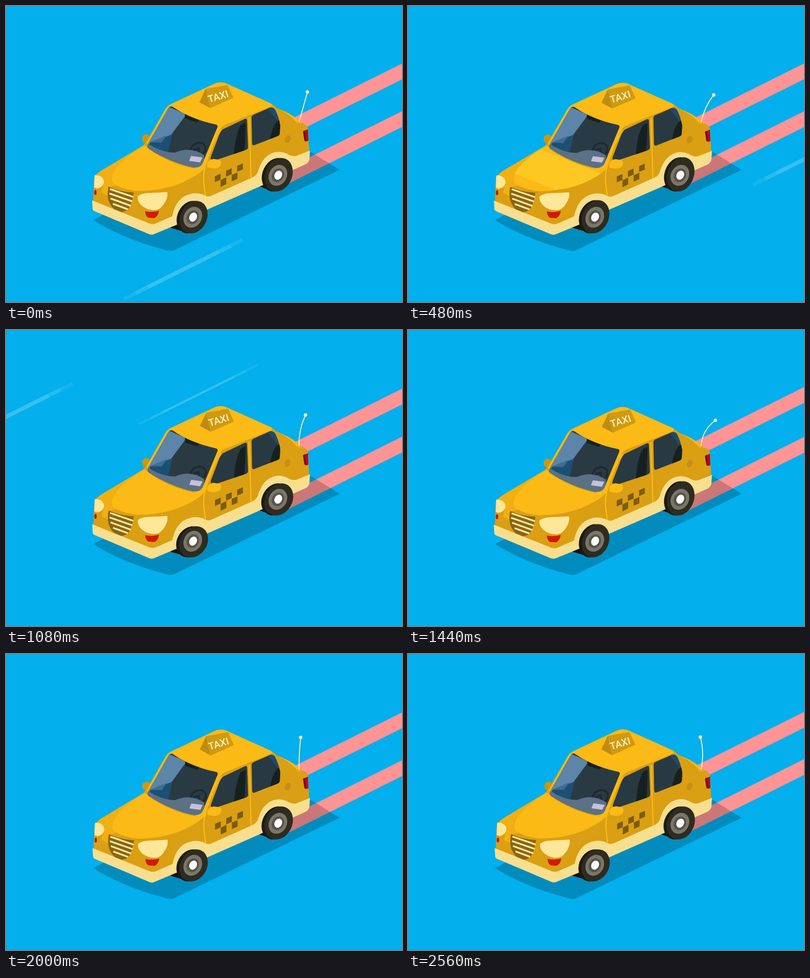
Animation, 800 px wide and 600 px high, one loop 2.6 s. Source, as an HTML page:

```html
<!DOCTYPE html>
<html lang="en">
<head>
<meta charset="utf-8">
<title>Taxi ride</title>
<style>
  html, body { margin: 0; width: 100%; height: 100%; overflow: hidden; background: #03afec; }
  svg { display: block; width: 800px; height: 600px; }
  text { font: 500 20px Roboto, sans-serif; text-anchor: middle; }
</style>
</head>
<body>
<svg viewBox="0 0 800 600">
  <defs>
    <path id="glass" d="M328 207Q332 201 338 205Q372 229 423 240Q429 241 427 246L397 319Q392 329 377 327Q330 316 288 289Q284 285 287 279Z"/>
    <path id="hood" d="M214 348Q216 332 240 311Q262 293 281 282Q286 289 300 298Q340 322 378 329L404 326Q392 340 372 350Q330 374 266 375Q236 372 218 361Q213 356 214 348Z"/>
    <path id="frontWindow" d="M438 250L482 229Q487 227 487 233L489 286Q489 290 484 292L422 313Q411 315 414 305L427 271Q432 255 438 250Z"/>
    <path id="rearWindow" d="M496 226Q496 222 501 220L533 206Q541 204 545 213Q551 226 554 242L553 258Q553 262 548 264L502 282Q497 284 497 277Z"/>
    <clipPath id="inGlass"><use href="#glass"/></clipPath>
    <clipPath id="inHood"><use href="#hood"/></clipPath>
    <clipPath id="inFront"><use href="#frontWindow"/></clipPath>
    <clipPath id="inRear"><use href="#rearWindow"/></clipPath>
    <path id="band" d="M150-76L460 48V118L150-6Z"/>
    <g id="tire">
      <ellipse cx="373" cy="428.5" rx="27" ry="34" fill="#1b1a14" transform="rotate(28 373 428.5)"/>
      <ellipse cx="379" cy="428.5" rx="27" ry="34" fill="#2e2c20" transform="rotate(28 379 428.5)"/>
    </g>
    <g id="rim" transform="rotate(28 378 428)">
      <ellipse cx="377.5" cy="428.5" rx="18" ry="22" fill="#7b7768"/>
      <ellipse cx="377.5" cy="428.5" rx="12" ry="14.5" fill="#56534a"/>
      <ellipse cx="378" cy="428" rx="7.5" ry="9.5" fill="#fff"/>
    </g>
    <!-- nested strokes make the stepped fade at both ends -->
    <g id="streak" stroke="#fff" stroke-opacity=".075">
      <path d="M0 0L240-120M24-12L216-108M48-24L192-96"/>
      <path d="M24-12L216-108"/>
      <path d="M48-24L192-96"/>
    </g>
  </defs>

  <g fill="#fe9496">
    <path id="trackA" d="M572 231L810 112V144L572 263Z"/>
    <path id="trackB" d="M550 338L810 208V240L550 370Z"/>
  </g>
  <path d="M176 434L202 420L400 370L616 296L674 332L340 495Q334 498 324 495Q240 474 176 434Z" opacity=".2"/>
  <g id="streaks"></g>
  <path d="M328 448L350 438L354 456ZM510 365L526 352L530 372Z" fill="#14130e"/>

  <g id="car">
    <ellipse cx="283" cy="269" rx="8.5" ry="9" fill="#d0960f"/>
    <path fill="#da9f13" d="M178 347Q182 340 195 332L275 285L284 274L322 209Q326 202 335 198L420 158Q432 152 445 157L534 197Q542 201 546 206L570 217Q586 226 597 237Q610 240 610 250L613 300L400 400L295 450L176 402Z"/>
    <path fill="#fbba15" d="M284 277L322 209Q326 202 335 198L420 158Q432 152 445 157L534 197Q542 202 532 205L440 242Q430 248 423 268L403 325L390 331L288 291Z"/>
    <path fill="#f0b014" d="M180 346Q185 338 197 331L282 280L262 296Q219 327 214 348Q212 356 222 364L207 367L205 384L192 378L199 355Z"/>
    <path fill="#fbba15" d="M546 206L570 217Q586 226 597 237L588 237Q575 220 546 206Z"/>
    <use href="#hood" fill="#fbba15"/>
    <path fill="none" stroke="#fbba15" stroke-width="2.5" d="M434 250Q418 275 405 315Q397 340 400 362L403 386M491 226L495 349"/>

    <use href="#glass" fill="#2a3a43"/>
    <g clip-path="url(#inGlass)">
      <path fill="#5c85a9" d="M320 200L364 220L333 262L280 290Z"/>
      <path fill="#1d4f72" d="M291 277L336 260L326 300L286 288Z"/>
      <path fill="#3e6d91" d="M291 276L325 262L314 277Z"/>
      <path fill="#16211f" d="M361 215L392 229L386 236L362 228Z"/>
      <ellipse cx="388" cy="291" rx="16" ry="13" fill="none" stroke="#1e2a31" stroke-width="4" transform="rotate(-30 388 291)"/>
      <path fill="none" stroke="#1e2a31" stroke-width="4" d="M378 292L389 288L391 302"/>
      <path fill="#5a7186" d="M280 274Q312 298 342 297Q372 284 400 302V340H280Z"/>
      <path fill="#c9c0d8" d="M374 304L397 307L392 317L370 314Z"/>
      <use class="band" href="#band" fill="#55c8f5" opacity=".42"/>
    </g>
    <g clip-path="url(#inHood)"><use class="band" href="#band" fill="#ffd42e" opacity=".55"/></g>

    <use href="#frontWindow" fill="#293942"/>
    <path clip-path="url(#inFront)" fill="#16211f" d="M484 236L474 241Q463 262 460 305L481 299Q484 262 484 236Z"/>
    <use href="#rearWindow" fill="#293942"/>
    <g clip-path="url(#inRear)">
      <path fill="#1e4b6b" d="M527 205H547L556 242L548 232Z"/>
      <path fill="#16211f" d="M550 232Q537 242 533 275L556 266V232Z"/>
    </g>

    <path fill="#7b5c12" d="M422 345l11.5-5v12l-11.500 5zM444.500 334l11.500-5v12l-11.500 5zM467 324l11.500-5v12l-11.500 5zM433.500 353l11.500-6v14l-11.500 6zM456 342.500l11.500-5v13l-11.500 5z"/>
    <path fill="#fbba15" d="M406 320Q410 310 420 310L432 312Q437 316 433 324Q429 330 418 329L407 327Z"/>
    <ellipse cx="569" cy="270" rx="5.500" ry="8" fill="#c58f12" transform="rotate(20 569 270)"/>
    <path fill="#b30f12" d="M600 254L610 250L611 273Q606 276 603 273Z"/>
    <path fill="#7d0c10" d="M600 254L604 252L607 274L603 273Z"/>

    <path fill="#8a6512" d="M207 366Q230 377 258 378Q255 400 246 413Q236 419 226 418Q213 410 207 394Q204 380 207 366Z"/>
    <path stroke="#ffe9a3" stroke-width="3.500" d="M210 371L257 387M209 380L255 396M211 390L252 405M216 401L246 412"/>
    <path fill="#ffe79a" d="M266 386C276 376 303 380 325 377C329 384 322 402 310 411C298 418 271 411 266 391ZM179 343Q195 342 198 356Q197 367 184 370L178 368Z"/>
    <ellipse cx="180.500" cy="378" rx="2.500" ry="5" fill="#c3151b"/>
    <path fill="#d31900" d="M281 416Q295 419 309 415Q308 425 300 430L287 429Q281 424 281 416Z"/>
    <path fill="#f7df8f" d="M174 394L290 441Q296 443 302 441L336 426Q341 399 358 387Q378 375 398 382Q406 388 414 385L497 348Q508 343 510 332Q519 304 541 297Q554 293 567 299Q577 306 586 304L614 293L613 311Q611 318 605 321L578 333L517 364L408 412L346 443L300 462Q294 465 288 462L179 416Q175 414 175 411Z"/>

    <g id="sign">
      <path fill="#bf8c11" d="M390 195L403 168L412 207Z"/>
      <path fill="#cf9a13" d="M403 168L447 160L459 186L412 207Z"/>
      <text fill="#ffefb8" transform="translate(430 190) rotate(-17)">TAXI</text>
    </g>
  </g>

  <g id="tires"><use href="#tire"/><use href="#tire"/></g>
  <use href="#rim"/>
  <use href="#rim" x="172" y="-85"/>

  <ellipse cx="592" cy="236.500" rx="5" ry="2.500" fill="#e9ab14"/>
  <path id="antenna" fill="none" stroke="#f9eaa4" stroke-width="2"/>
  <circle id="tip" r="3.500" fill="#f9eaa4"/>
</svg>
<script>
const LOOP = 2600, STEP = 40, SPEED = 3.4, BOUNCE = 440, SWAY = 1320;
const $ = id => document.getElementById(id);
const set = (el, name, value) => el.setAttribute(name, value);
const move = (el, x, y) => set(el, 'transform', `translate(${x} ${y})`);

// each streak: [time it enters at x = 0, height there]
const thick = [[-70, 713], [157, 334], [275, 711], [620, 754], [641, 348], [1111, 176], [1536, 753]];
const thin = [[131, 797], [510, 908], [1001, 325], [1672, 839], [2192, 254]];

const makeStreaks = (list, width) => list.map(([start, height]) => {
  const el = $('streak').cloneNode(true);
  el.removeAttribute('id');
  el.firstElementChild.setAttribute('d', 'M0 0L240-120');
  set(el, 'stroke-width', width);
  $('streaks').append(el);
  return { el, start, height };
});
const streaks = [...makeStreaks(thick, 8), ...makeStreaks(thin, 4.5)];

function draw(t) {
  const wave = (period, peak) => Math.cos((t - peak) / period * 2 * Math.PI);

  // the body stretches up and forward on its springs
  const lean = wave(BOUNCE, 92), drop = 2 * lean - .5, k = drop / 405;
  set($('car'), 'transform', `matrix(${1 + k / 2} 0 0 ${1 - k} ${-307 * k} ${560 * k})`);
  move($('sign'), 1 + wave(BOUNCE, 140), 0);

  const x = 604.5 + 17.8 * lean, y = 168.5 + (x - 589) ** 2 / 70;
  const bend = 596 + 5 * wave(BOUNCE, 424);
  set($('antenna'), 'd', `M592 ${235 + drop / 2}Q${bend} 203 ${x} ${y}`);
  move($('tip'), x, y);

  const squash = .6 - .5 * wave(SWAY, 300);
  const sx = .955 + .065 * squash, sy = 1.06 - .085 * squash;
  [...$('tires').children].forEach((tire, i) => set(tire, 'transform',
    `translate(${376 + 172 * i} ${461 - 85 * i}) scale(${sx} ${sy + .03 * i}) translate(-376 -461)`));

  const glare = 67 + t % SWAY * .525;
  document.querySelectorAll('.band').forEach(el => move(el, 0, glare));

  move($('trackA'), 0, .5 - 2 * wave(SWAY, 250));
  move($('trackB'), 0, 2 - 2 * wave(LOOP, 150));

  for (const { el, start, height } of streaks) {
    const left = SPEED * (t - start);
    move(el, left, height - left / 2);
  }
}

function tick() {
  draw(Math.floor(performance.now() % LOOP / STEP) * STEP);
  requestAnimationFrame(tick);
}
tick();
</script>
</body>
</html>
```
